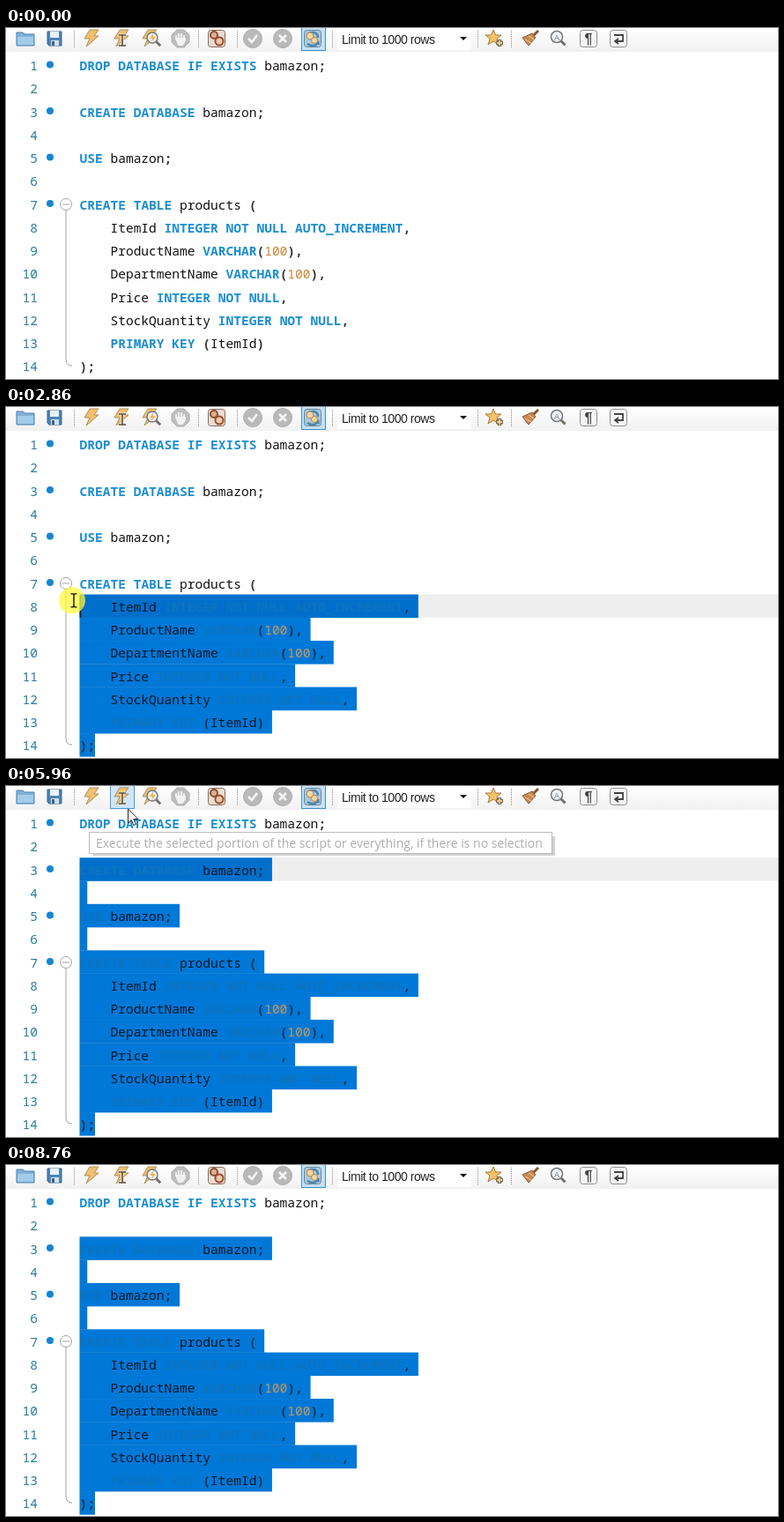
These frames come from a looping animation (876 px wide and 398 px high, 8.84 s). An HTML page with a canvas:

```html
<!DOCTYPE html>
<html lang="en">
<head>
<meta charset="utf-8">
<title>SQL editor</title>
<style>
html, body { margin: 0; width: 100%; height: 100%; overflow: hidden; background: #fff; }
canvas { display: block; }
</style>
</head>
<body>
<canvas width="876" height="398"></canvas>
<script>
const ctx = document.querySelector('canvas').getContext('2d');
const LOOP = 8840, LEFT = 83.5, TOP = 28.8, ROW = 26.25, CHAR = 8.736;
const MONO = '14.56px "Noto Sans Mono", "DejaVu Sans Mono", monospace';
const PRESS = 1930, DRAG_END = 4100, RELEASE = 4330, BLUR = 8760;

const code = `DROP DATABASE IF EXISTS bamazon;

CREATE DATABASE bamazon;

USE bamazon;

CREATE TABLE products (
    ItemId INTEGER NOT NULL AUTO_INCREMENT,
    ProductName VARCHAR(100),
    DepartmentName VARCHAR(100),
    Price INTEGER NOT NULL,
    StockQuantity INTEGER NOT NULL,
    PRIMARY KEY (ItemId)
);`.split('\n');
const LAST = code.length - 1;

// Pointer moves: first step, last step, number of steps, x, y
const moves = [
  [0, 0, 1, 507, 420], [230, 230, 1, 507, 395], [305, 380, 2, 469, 389],
  [520, 600, 2, 275, 388], [690, 690, 1, 270, 420],
  [840, 840, 1, 204, 394], [920, 1000, 2, 171, 376],
  [1380, 1530, 3, 126, 376], [1610, 1610, 1, 132, 381], [1690, 1760, 2, 134, 382],
  [PRESS, PRESS, 1, 101, 383], [2080, 2310, 4, 86, 281], [2400, 2480, 2, 83, 268],
  [2630, 3470, 12, 65, 122], [3560, 3640, 2, 65, 114], [3780, 3780, 1, 65, 112],
  [3950, DRAG_END, 3, 65, 106], [RELEASE, RELEASE, 1, 65, 107],
  [4570, 5120, 8, 91, 23], [5200, 5340, 3, 95, 20], [5490, 5800, 5, 138, 26],
  [7520, 7740, 4, 685, 300], [7970, 8300, 5, 747, 420]
];

function pointer(t) {
  let x = 507, y = 420;
  for (const [t0, t1, n, px, py] of moves) {
    if (t < t0) break;
    const done = t >= t1 ? 1 : (Math.floor((t - t0) / (t1 - t0) * (n - 1) + 1e-6) + 1) / n;
    x += (px - x) * done;
    y += (py - y) * done;
  }
  return { x, y };
}

const clamp = (v, lo, hi) => Math.max(lo, Math.min(hi, v));
const rowTop = row => TOP + row * ROW;

function rect(x, y, w, h, fill, stroke) {
  if (fill) { ctx.fillStyle = fill; ctx.fillRect(x, y, w, h); }
  if (stroke) { ctx.lineWidth = 1; ctx.strokeStyle = stroke; ctx.strokeRect(x + .5, y + .5, w - 1, h - 1); }
}

function shape(x, y, d, fill, stroke, width = 1) {
  const path = new Path2D(d);
  ctx.save();
  ctx.translate(x, y);
  if (fill) { ctx.fillStyle = fill; ctx.fill(path); }
  if (stroke) { ctx.lineWidth = width; ctx.strokeStyle = stroke; ctx.stroke(path); }
  ctx.restore();
}

function disc(x, y, r, fill, stroke, width = 1) {
  ctx.beginPath();
  ctx.arc(x, y, r, 0, 7);
  if (fill) { ctx.fillStyle = fill; ctx.fill(); }
  if (stroke) { ctx.lineWidth = width; ctx.strokeStyle = stroke; ctx.stroke(); }
}

function text(s, x, y, font, fill, spacing = 0) {
  ctx.font = font;
  ctx.fillStyle = fill;
  ctx.letterSpacing = spacing + 'px';
  ctx.fillText(s, x, y);
}

const barFill = ctx.createLinearGradient(0, 0, 0, 27);
barFill.addColorStop(0, '#ffffff');
barFill.addColorStop(1, '#f1f1f1');

const bolt = x => shape(x, 12, 'M-2-10H8L3-3H8L-6 9L-2 0H-8Z', '#f0c070', '#b08d58');

function lens(x, y, r) {
  shape(x, y, `M${r * .7} ${r * .7}l5 5`, null, '#77706a', 3);
  disc(x, y, r, '#eef3f6', '#77777a', 1.5);
}

function button(x, fill = '#f5f5f5', stroke = '#8d8d8d') {
  ctx.beginPath();
  ctx.roundRect(x - 9.5, 2.5, 19, 19, 3);
  ctx.fillStyle = fill; ctx.fill();
  ctx.strokeStyle = stroke; ctx.lineWidth = 1; ctx.stroke();
}

function toolbar(p) {
  rect(0, 0, 876, 27, barFill);
  for (const x of [77, 218, 262, 370, 535, 573]) {
    for (let y = 3; y < 23; y += 2) rect(x, y, 1, 1, '#8f8f8f');
  }
  if (p.y < 28) {
    for (const x of [84, 118]) if (p.x >= x && p.x < x + 28) rect(x, -1, 28, 27, '#cfe6f8', '#4b9bd9');
  }

  // Folder and disk
  shape(22, 12, 'M-10 8V-7H-3L-1-5H10V8Z', '#7fb0d8', '#4f82ad');
  shape(22, 12, 'M-9 7V-2H9V7Z', '#a3cbea');
  shape(55, 12, 'M-8-8H8V8H-6L-8 6Z', '#4d83b3', '#39658e');
  rect(50, 4, 10, 7, '#e8f1f8');
  rect(51, 14, 9, 6, '#d4dfe8');
  rect(52, 15, 3, 5, '#39658e');

  // Execution
  bolt(97);
  bolt(131);
  shape(131, 12, 'M-3-4H5M1-4V8M-3 8H5', null, '#f4ead8', 3);
  shape(131, 12, 'M-3-4H5M1-4V8M-3 8H5', null, '#5c5145', 1.6);
  bolt(163);
  lens(166, 11, 6);
  shape(166, 11, 'M1-5L-3 1H0L-1 5L4-1H1Z', '#efb74c');
  shape(198, 12, 'M-4-10H4L10-4V4L4 10H-4L-10 4V-4Z', '#bdbdbd', '#b0b0b0');
  shape(198, 12, 'M-5 1V-4M-2 1V-6M1 1V-6M4 1V-4M-5 0H5V3L2 7H-2Z', '#f2f2f2', '#f2f2f2', 1.8);
  button(239, '#e9ddd3', '#8b6c58');
  disc(236, 8, 4, '#d9b398', '#8f4f33', 2);
  disc(242, 15, 4.5, '#eac9ae', '#9b4b2d', 2);

  // Transactions
  disc(280, 12, 10.5, '#b9b9b9', '#adadad');
  shape(280, 12, 'M-5 0L-1 4L5-4', null, '#f4f4f4', 2.5);
  disc(314, 12, 10.5, '#b9b9b9', '#adadad');
  shape(314, 12, 'M-4-4L4 4M4-4L-4 4', null, '#f4f4f4', 2.5);
  rect(335, -1, 28, 27, '#c6e0f4', '#3f8fcd');
  button(348, '#a9c9df', '#6d8799');
  shape(348, 12, 'M-6 6C-2 9 4 9 6 4L3 4M6 4L7 7M-6-5C0-9 6-7 6-1', null, '#4f86ad', 2.5);
  disc(345, 9, 4, '#f0d8a8', '#ba8546');
  disc(350, 14, 3.5, '#f0d8a8', '#ba8546');

  // Row limit
  rect(376, 0, 152, 25, '#fff');
  text('Limit to 1000 rows', 381, 17.5, '14px "Liberation Sans", Arial, sans-serif', '#222', -.45);
  shape(519, 12, 'M-4-2H4L0 2Z', '#111');

  // Snippets, beautify, search and view
  shape(553, 11, 'M0-9L2.6-3H9L4 1L6 8L0 4L-6 8L-4 1L-9-3H-2.6Z', '#f3c269', '#a57c3c');
  shape(560, 17, 'M-4 0H4M0-4V4', null, '#756a5c', 4.5);
  shape(560, 17, 'M-3 0H3M0-3V3', null, '#f3c98a', 1.8);
  shape(595, 12, 'M3-3L9-9', null, '#8c552d', 3);
  shape(595, 12, 'M-9-1L2-6L6-1L-2 8Z', '#c68a51', '#8c5b37');
  shape(595, 12, 'M-6 1L1 5M-2-3L4 1', null, '#efcfaa', 1);
  lens(625, 10, 6.5);
  text('A', 622, 14, '9px "Liberation Sans", sans-serif', '#777');
  button(661);
  text('¶', 656.5, 18, 'bold 16px "Liberation Sans", sans-serif', '#444');
  button(695);
  shape(695, 12, 'M-5-4H5V3H-3M0 0L-4 3L0 6', null, '#444', 1.8);
}

function gutter() {
  ctx.textAlign = 'right';
  code.forEach((_, i) => text(i + 1, 36, rowTop(i) + 19.2, MONO, '#287c9f'));
  ctx.textAlign = 'left';
  for (const i of [0, 2, 4, 6]) disc(50, rowTop(i) + 12.6, 4, '#1685d1');
  disc(68, 200, 6.5, '#fff', '#a3a6a0');
  shape(68, 200, 'M-4 0H4M0 7V176Q0 183 7 183', null, '#a3a6a0');
}

function tokens(line, row, selected) {
  for (const m of line.matchAll(/\w+|[^\w\s]+/g)) {
    const word = m[0], keyword = /^[A-Z_]+$/.test(word), mark = /^\W/.test(word);
    const color = keyword ? (selected ? '#0c73c0' : '#1c8ed0')
      : /^\d/.test(word) ? (selected ? '#c9975a' : '#c98535')
      : mark ? (selected ? '#1c3450' : '#333')
      : selected ? '#06182a' : '#111';
    text(word, LEFT + m.index * CHAR, rowTop(row) + 19.2, (keyword || mark ? 'bold ' : '') + MONO, color);
  }
}

function editor(t) {
  const active = t >= PRESS;
  const p = pointer(Math.min(t, DRAG_END));
  const row = clamp(Math.floor((p.y - TOP) / ROW), 0, LAST);
  const col = clamp(Math.round((p.x - LEFT) / CHAR), 0, row === LAST ? 2 : code[row].length);
  const focused = active && t < BLUR;

  if (focused) rect(84, rowTop(row), 792, ROW, '#eeeeee');
  code.forEach((line, i) => {
    const selected = active && i >= row;
    if (selected) {
      const from = i === row ? col : 0;
      const to = i === LAST ? 2 : line.length + 1;
      rect(LEFT + from * CHAR, rowTop(i), (to - from) * CHAR, ROW + .3,
        focused && i === row ? '#006fcb' : '#0078d7');
    }
    tokens(line, i, selected && !(i === row && col >= line.length));
  });
  const lit = t < 4540 || Math.floor((t - 4540) / 530) % 2;
  if (focused && lit) rect(LEFT + col * CHAR, rowTop(row), 2, ROW, '#12304a');
}

function tooltip(t) {
  if (t < 5900 || t >= 7520) return;
  ctx.globalAlpha = clamp((t - 5820) / 290, 0, 1);
  rect(99, 77, 524, 2, '#a2a2a2');
  rect(620, 57, 3, 20, '#a2a2a2');
  rect(94, 52, 526, 25, '#fff', '#767676');
  text('Execute the selected portion of the script or everything, if there is no selection',
    102, 69.5, '14px "Open Sans", "Noto Sans", sans-serif', '#575757');
  ctx.globalAlpha = 1;
}

function cursor(t, { x, y }) {
  const pressed = t >= PRESS && t < RELEASE;
  if (pressed) disc(x - 2, y, 15, 'rgba(255, 248, 60, .75)');
  if (pressed || (x >= LEFT && y > 28)) {
    shape(x, y, 'M-3.5-7.5H-1L0-6.5L1-7.5H3.5M0-7V7M-3.5 7.5H-1L0 6.5L1 7.5H3.5', null, '#111', 1.4);
  } else {
    const clicked = t >= 7440 && t < 7520;
    shape(x + .5, y, 'M0 0V16L3.7 12.5L6.3 18.5L9 17.3L6.4 11.5H11.5Z',
      clicked ? '#e6f8dc' : '#fff', clicked ? '#2c4a28' : '#222');
  }
}

function frame(now) {
  const t = now % LOOP, p = pointer(t);
  rect(0, 0, 876, 398, '#fff');
  toolbar(p);
  gutter();
  editor(t);
  tooltip(t);
  cursor(t, p);
  requestAnimationFrame(frame);
}
requestAnimationFrame(frame);
</script>
</body>
</html>
```
